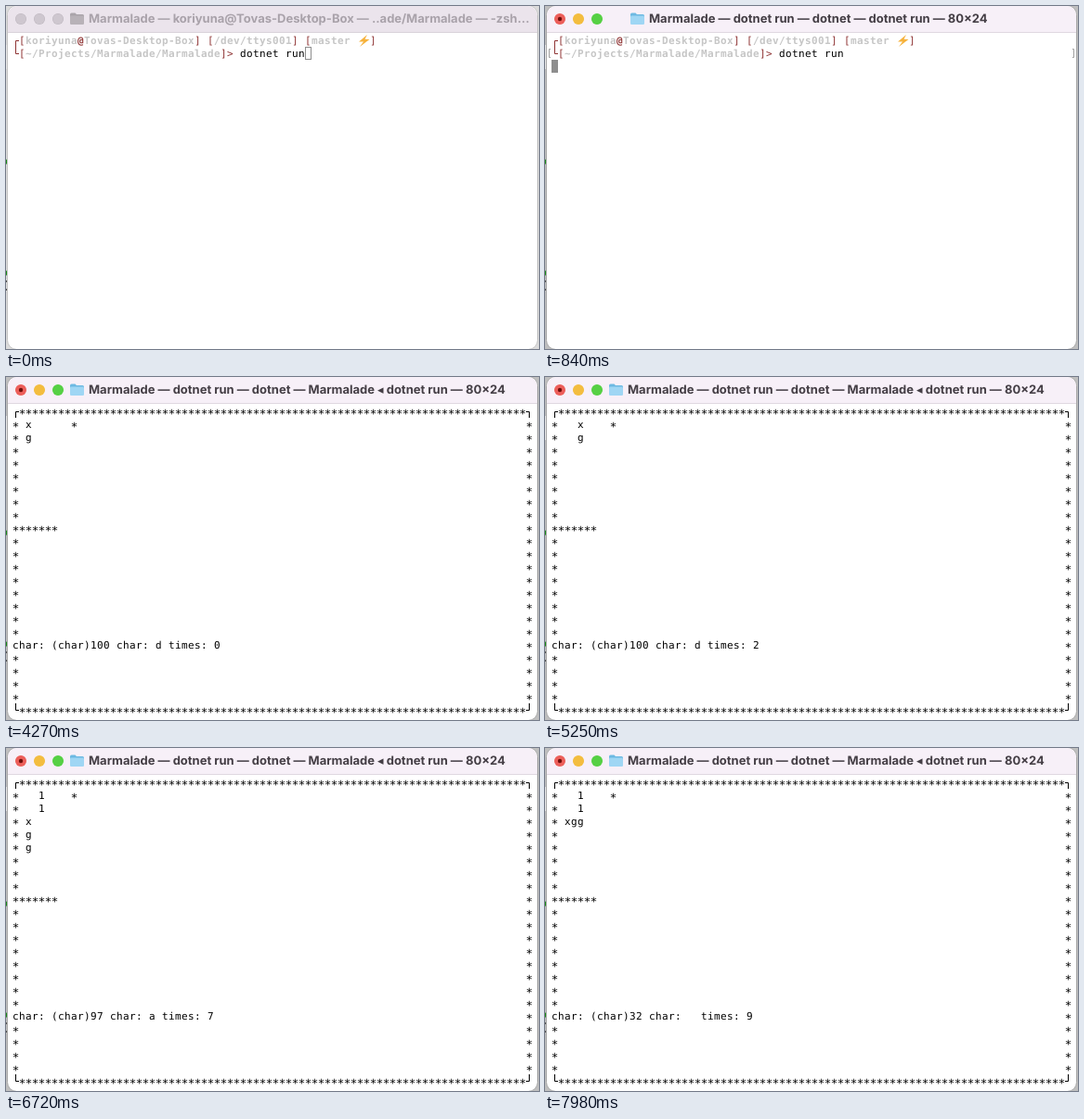
Write an HTML page that moves like this. It is 574 px wide and 370 px high and loops after 8 s.

```html
<!DOCTYPE html>
<html lang="en">
<head>
<meta charset="utf-8">
<title>Terminal session</title>
<style>
html, body { margin: 0; width: 100%; height: 100%; overflow: hidden; background: #fff; }
svg { display: block; width: 574px; height: 370px; }
text { text-rendering: geometricPrecision; }
.mono { font: 11px "DejaVu Sans Mono", "Noto Sans Mono", monospace; }
.bold { font-weight: 700; }
.star { font-size: 12.5px; }
.title { font: 700 13px Inter, "DejaVu Sans", sans-serif; }
</style>
</head>
<body>
<svg id="stage" viewBox="0 0 574 370" width="574" height="370"></svg>
<script>
const LOOP = 8000, CELL_W = 7, CELL_H = 14, LEFT = 7, TOP = 30;
const INK = '#000', FAINT = '#c6c6c6', RED = '#8f3434';
const stage = document.getElementById('stage');

const colX = c => LEFT + c * CELL_W;
const rowY = r => TOP + r * CELL_H;

function mix(a, b, k) {
  const part = (hex, i) => parseInt(hex.substr(1 + 2 * i, 2), 16);
  return `rgb(${[0, 1, 2].map(i => Math.round(part(a, i) + (part(b, i) - part(a, i)) * k))})`;
}

// Places a string on the terminal grid, one glyph per cell.
function put(row, col, str, fill = INK, cls = '', dx = 0, dy = 0) {
  const xs = [...str].map((_, i) => (colX(col + i) + dx).toFixed(2)).join(' ');
  return `<text class="mono ${cls}" x="${xs}" y="${rowY(row) + 11 + dy}" fill="${fill}">${str.replace(/ /g, '\u00a0')}</text>`;
}
const stars = (row, col, n = 1) => put(row, col, '*'.repeat(n), INK, 'star', -0.26, 2.5);

// Box-drawing corner: sx and sy point along its two arms.
function corner(row, col, sx, sy, color) {
  const x = colX(col) + 3.5, y = rowY(row) + 7.5;
  const endY = sy > 0 ? rowY(row + 1) : rowY(row);
  return `<path d="M${x + 3.5 * sx} ${y}H${x}V${endY}" fill="none" stroke="${color}"/>`;
}

const rect = (x, y, w, h, fill, extra = '') =>
  `<rect x="${x}" y="${y}" width="${w}" height="${h}" fill="${fill}" ${extra}/>`;
const disc = (x, y, r, fill) => `<circle cx="${x}" cy="${y}" r="${r}" fill="${fill}"/>`;

function folder(x, k) {
  const back = mix('#aaa4aa', '#6db9e2', k), front = mix('#b8b2b8', '#9fd6f4', k);
  return `<path d="M${x} 9q0-1.500 1.500-1.500h4l1.500 1.500h6.500q1.500 0 1.500 1.500v4h-15z" fill="${back}"/>` +
    rect(x, 10.500, 15, 9.500, front, 'rx="1.300"');
}

function chrome(k, title, x) {
  const off = '#cec7cf';
  const lights = ['#ec5f5a', '#f3bd3f', '#56d044'];
  return rect(0, 0, 574, 370, mix('#dcdcdc', '#bfbfbf', k)) +
    rect(0, 42, 2, 26, '#e9e9e9') +
    disc(0, 168, 2.6, '#168a16') + disc(0, 288, 2.6, '#168a16') +
    rect(0, 296, 1, 2, '#555') + rect(0, 305, 1, 2, '#555') +
    rect(1.5, -0.5, 571, 371, '#fff', `rx="10" stroke="${mix('#c4c4c4', '#a9a9a9', k)}"`) +
    `<path d="M2 28V10A10 10 0 0 1 12 0H562A10 10 0 0 1 572 10V28Z" fill="${mix('#ebe4ec', '#f7f0f8', k)}"/>` +
    rect(2, 28, 570, 1, mix('#d9d2da', '#dfd8e0', k)) +
    lights.map((c, i) => disc(16 + 20 * i, 14, 6, mix('#bdb6be', c, k)) +
      disc(16 + 20 * i, 14, 5.5, mix(off, c, k))).join('') +
    disc(16, 14, 2.2, mix(off, '#6d0f0b', k)) +
    folder(x - 20, k) +
    `<text class="title" x="${x}" y="18" fill="${mix('#a9a2aa', '#443e45', k)}">${title}</text>`;
}

function prompt() {
  const red = (r, c, s) => put(r, c, s, RED);
  const faint = (r, c, s) => put(r, c, s, FAINT, 'bold');
  return corner(0, 0, 1, 1, RED) + corner(1, 0, 1, -1, RED) +
    red(0, 1, '[') + faint(0, 2, 'koriyuna') + put(0, 10, '@', RED, 'bold') +
    faint(0, 11, 'Tovas-Desktop-Box') + red(0, 28, ']') +
    red(0, 30, '[') + faint(0, 31, '/dev/ttys001') + red(0, 43, ']') +
    red(0, 45, '[') + faint(0, 46, 'master') +
    '<path d="M389 31L380 38.500L385 38.500L381 44L391.500 36L386.500 35.800Z" fill="#f6b23c"/>' +
    red(0, 55, ']') +
    red(1, 1, '[') + faint(1, 2, '~/Projects/Marmalade/Marmalade') + red(1, 32, ']>') +
    put(1, 35, 'dotnet run');
}

const block = (row, col) => rect(colX(col), rowY(row), CELL_W, CELL_H, '#8e8e8e');

function shell(t) {
  if (t < 70) {
    return prompt() + rect(322.5, 44.5, 6, 13, 'none', 'stroke="#8e8e8e"');
  }
  if (t < 770) return prompt() + block(1, 45);
  const marks = '<path d="M6 46.500H4.500V55.500H6M568 46.500H569.500V55.500H568" fill="none" stroke="#a0a0a0"/>';
  return prompt() + marks + block(2, 0);
}

// Each key press: time, key, piece column, piece row, piece shape.
const moves = [
  [4270, 'd', 2, 1, 'x/g'],
  [4830, 'd', 3, 1, 'x/g'],
  [5250, 'd', 4, 1, 'x/g'],
  [5740, 'r', 4, 1, 'x/g/g'],
  [6020, 's', 4, 2, 'x/g/g'],
  [6230, 's', 4, 3, 'x/g/g'],
  [6510, 'a', 3, 3, 'x/g/g'],
  [6720, 'a', 2, 3, 'x/g/g'],
  [7490, 'r', 2, 3, 'xgg'],
  [7980, ' ', 2, 3, 'xgg']
];

function board() {
  let s = stars(0, 1, 78) + stars(23, 1, 78) +
    corner(0, 0, 1, 1, INK) + corner(0, 79, -1, 1, INK) +
    corner(23, 0, 1, -1, INK) + corner(23, 79, -1, -1, INK);
  for (let r = 1; r <= 22; r++) {
    if (r !== 18) s += stars(r, 0, r === 9 ? 7 : 1);
    s += stars(r, 79);
  }
  return s + stars(1, 9);
}

function game(n) {
  const [, key, col, row, shape] = moves[n];
  let s = board();
  for (let r = 1; r < row; r++) s += put(r, 4, '1');
  shape.split('/').forEach((line, i) => { s += put(row + i, col, line); });
  return s + put(18, 0, `char: (char)${key.charCodeAt(0)} char: ${key} times: ${n}`);
}

function scene(t) {
  const k = Math.min(5, Math.floor(t / 70)) / 5;
  if (t < 840) {
    return chrome(k, 'Marmalade — koriyuna@Tovas-Desktop-Box — ..ade/Marmalade — -zsh…', 89) + shell(t);
  }
  if (t < 3150) {
    return chrome(1, 'Marmalade — dotnet run — dotnet — dotnet run — 80×24', 112) + shell(t);
  }
  const bar = chrome(1, 'Marmalade — dotnet run — dotnet — Marmalade ◂ dotnet run — 80×24', 89);
  const n = moves.filter(m => m[0] <= t).length - 1;
  return bar + (n < 0 ? put(0, 0, 'press any key to continue...') : game(n));
}

let shown = '';
function render(t) {
  const markup = scene(t);
  if (markup !== shown) stage.innerHTML = shown = markup;
}

const start = performance.now();
function tick() {
  render((performance.now() - start) % LOOP);
  requestAnimationFrame(tick);
}
tick();
</script>
</body>
</html>
```
